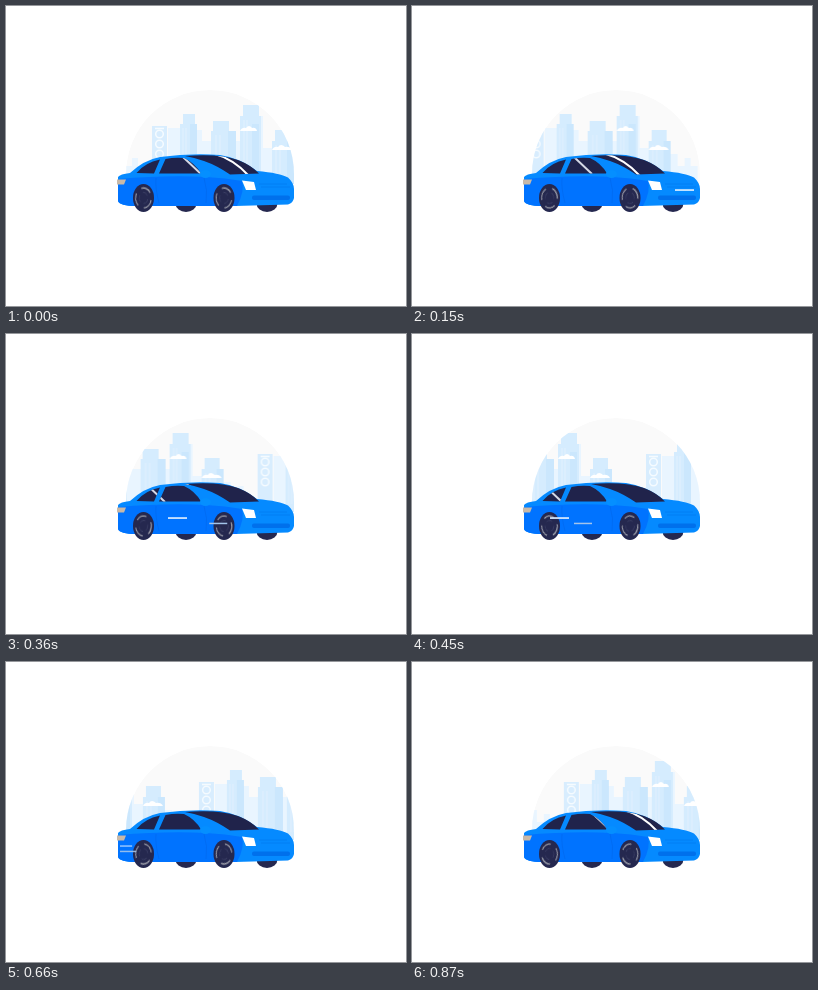
These frames come from a looping animation (400 px wide and 300 px high, 900 ms). An HTML page:

```html
<!DOCTYPE html>
<html lang="en">
<head>
<meta charset="utf-8">
<title>Driving car</title>
<style>
  html, body { margin: 0; width: 100%; height: 100%; overflow: hidden; background: #fff; }
  svg { display: block; width: 400px; height: 300px; }

  .city { animation: city .9s steps(30) infinite; }
  .rim { animation: spin .9s steps(30) infinite; }
  .shine { animation: shine .9s infinite -.12s; }
  .streak { animation: streak .9s infinite; transform-box: fill-box; transform-origin: left; }
  .late { animation-delay: -.81s; }

  @keyframes city { to { transform: translateX(-176px); } }
  @keyframes spin { to { transform: rotate(360deg); } }
  @keyframes shine {
    0% { transform: translateX(12px); opacity: 1; animation-timing-function: steps(20); }
    66.66% { transform: translateX(-48px); opacity: 1; }
    66.67%, 100% { transform: translateX(-48px); opacity: 0; }
  }
  @keyframes streak {
    0%, 10% { transform: translateX(286px) scaleX(0); animation-timing-function: steps(2); }
    16.667% { transform: translateX(263px) scaleX(1); animation-timing-function: steps(3); }
    26.667% { transform: translateX(217px) scaleX(1); animation-timing-function: steps(4); }
    40% { transform: translateX(162px) scaleX(1); animation-timing-function: steps(6); }
    60% { transform: translateX(114px) scaleX(1); opacity: 1; animation-timing-function: steps(4); }
    73.333% { transform: translateX(114px) scaleX(.65); opacity: .6; animation-timing-function: steps(2); }
    80%, 100% { transform: translateX(113px) scaleX(0); opacity: 0; }
  }
</style>
</head>
<body>
<svg viewBox="0 0 400 300">
  <defs>
    <clipPath id="dome"><path d="M120 178V168A84 84 0 0 1 288 168V178Z"/></clipPath>
    <path id="side" d="M130.500 167Q139 156.500 154 153.500L148 167.500ZM153 167.500L159.500 153Q169 151 178 152Q189 157 195 167.500Z"/>
    <path id="screen" d="M179 150Q214 147.500 232 154Q245 159 253 167.500L224 168.500Q211 159.500 198 155Q190 152 179 150Z"/>
    <clipPath id="sideClip"><use href="#side"/></clipPath>
    <clipPath id="screenClip"><use href="#screen"/></clipPath>

    <g id="block">
      <path fill="#e9f5ff" d="M119 180V160H126V152H132V160H139V180ZM162 180V122H174V180ZM189 180V124H196V135H206V180ZM228 180V135H237V180ZM253 180V110H257V180ZM257 180V142H266V180ZM286 180V148H295V180Z"/>
      <path fill="#d5ecfe" d="M174 180V118H177V108H189V118H191V180ZM205 180V125H207V115H223V125H230V180ZM234 180V110H237V99H253V110H255V180ZM266 180V135H269V124H284V135H288V180Z"/>
      <path fill="#cbe7fd" d="M184 180V118H191V180ZM222 180V125H230V180ZM246 180V118H253V180ZM281 180V135H288V180Z"/>
      <path fill="none" stroke="#e6f4ff" stroke-width=".8" d="M177 122V170M180 122V170M210 129V170M214 129V170M238 114V170M241 114V170M270 139V170M274 139V170"/>
      <path fill="#d8edfe" d="M146 180V120H161V180Z"/>
      <g fill="none" stroke="#f5fbff" stroke-width="1.500">
        <path d="M149 122.500H158"/>
        <circle cx="153.500" cy="128" r="3.800"/>
        <circle cx="153.500" cy="138" r="3.800"/>
        <circle cx="153.500" cy="148" r="3.800"/>
      </g>
      <path fill="#fff" d="M234 125Q236 121 240 122Q243 118 246 122Q250 121 251 125ZM266 144Q268 140 272 141Q275 137 279 141Q284 140 286 144Z"/>
    </g>

    <g id="wheel">
      <ellipse rx="10.500" ry="14" fill="#25284f"/>
      <g transform="scale(.78 1)">
        <g class="rim" fill="none">
          <circle r="10" stroke="#9a9ca8" stroke-width="1.300" stroke-dasharray="13 7.940"/>
          <circle r="5.500" stroke="#3a3e64" stroke-dasharray="7 4.520"/>
        </g>
      </g>
    </g>
  </defs>

  <g clip-path="url(#dome)">
    <circle cx="204" cy="168" r="84" fill="#fafafa"/>
    <g class="city">
      <use href="#block"/>
      <use href="#block" x="176"/>
    </g>
  </g>

  <g fill="#25284f">
    <ellipse cx="180" cy="197.500" rx="10.500" ry="8.500"/>
    <ellipse cx="261" cy="197.500" rx="10.500" ry="8.500"/>
  </g>
  <path fill="#058aff" d="M112 171Q114 168 124 167Q138 154 154 151Q184 147 214 149Q234 152 251 165Q274 167 282 171.500Q288 177 288 183V192Q287 197 282 198.500L229 200H130Q114 200 112 195Z"/>
  <path fill="#0073ff" d="M112 173Q160 169 200 171Q220 172 236 175Q239 185 231 200H130Q114 200 112 195Z"/>
  <path fill="none" stroke="#0069ee" stroke-width=".7" d="M150 172Q149 182 153 197M198 172Q202 184 200 197"/>

  <g fill="#20234b">
    <use href="#side"/>
    <use href="#screen"/>
  </g>
  <g clip-path="url(#sideClip)">
    <path class="shine" fill="none" stroke="#d5d9e6" stroke-width="2" d="M177 151L195 168"/>
  </g>
  <g clip-path="url(#screenClip)">
    <path class="shine" fill="none" stroke="#fff" stroke-width="2" d="M206 147Q228 153 243 170"/>
  </g>
  <ellipse cx="199.500" cy="168" rx="5.500" ry="4" fill="#058fff"/>

  <path fill="#c8b9a8" d="M111 173.500H120L118 178.500H111Z"/>
  <path fill="#fff" d="M236 174.500L248 176L250 184H240Z"/>
  <path fill="none" stroke="#007cf2" stroke-width=".8" d="M253 178H281M255 181H284"/>
  <rect x="246" y="189.500" width="38" height="4.500" rx="2" fill="#0070ec"/>

  <use href="#wheel" x="137.500" y="192"/>
  <use href="#wheel" x="218" y="192"/>

  <rect class="streak" y="183.200" width="19" height="1.700" fill="#d9ecff"/>
  <rect class="streak late" y="188.700" width="18" height="1.500" fill="#a3c4ea"/>
</svg>
</body>
</html>
```
